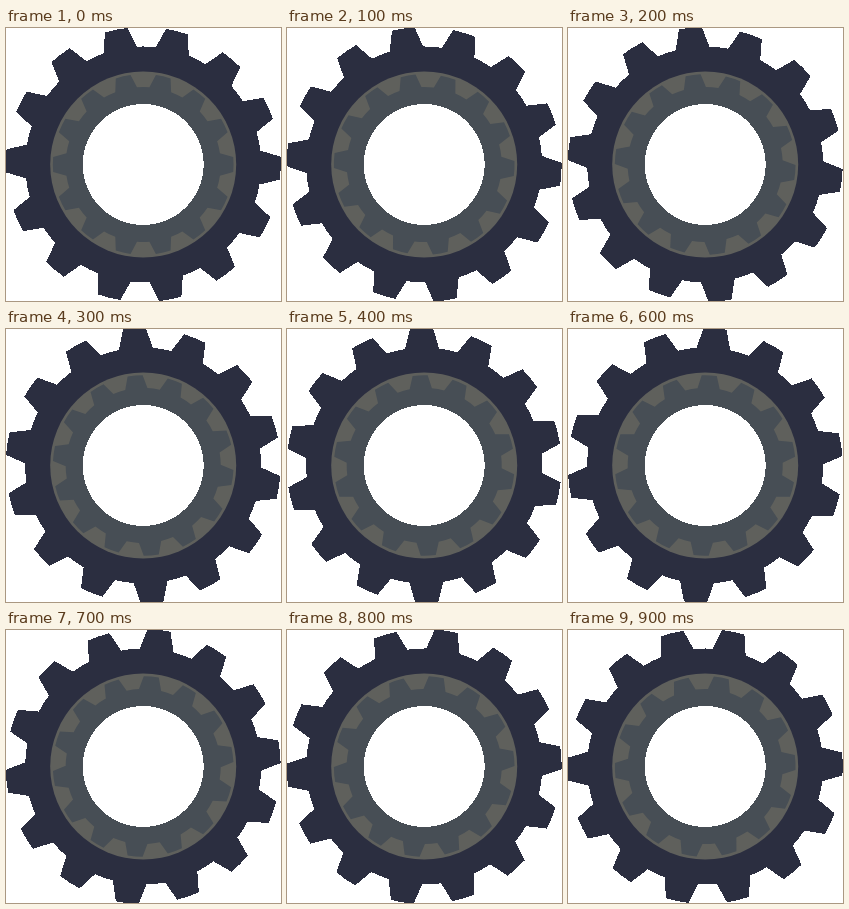
Recreate the animation shown at these times as an HTML page. Size 275 px wide and 273 px high, loop 1000 ms.

```html
<!DOCTYPE html>
<html lang="en">
<head>
<meta charset="utf-8">
<title>Turning gear</title>
<style>
  html, body { margin: 0; width: 100%; height: 100%; overflow: hidden; background: #fff; }
  svg { display: block; width: 100%; height: 100%; }
  .hard { shape-rendering: crispEdges; }
</style>
</head>
<body>
<svg viewBox="0 0 275 273">
  <g transform="translate(137.2 136.5)">
    <path id="outer" class="hard" fill="#2b2e40"/>
    <circle r="93" fill="#5f605c"/>
    <path id="inner" fill="#474e55"/>
    <circle class="hard" r="60.5" fill="#fff"/>
  </g>
</svg>
<script>
const TEETH = 14;
const PITCH = 360 / TEETH;
const LOOP = 1000;
const STEP = 100;

const byId = id => document.getElementById(id);

function point(radius, angle) {
  return `${(radius * Math.sin(angle)).toFixed(2)} ${(-radius * Math.cos(angle)).toFixed(2)}`;
}

// Trapezoid teeth joined by root arcs; the first tooth points straight up.
function gearPath(scale) {
  const tip = 137.5 * scale, root = 118 * scale;
  const tipHalf = 11.5 / 137.5, rootHalf = 17 / 118;
  let d = '';
  for (let i = 0; i < TEETH; i++) {
    const a = i * 2 * Math.PI / TEETH;
    d += i ? `A${root} ${root} 0 0 1 ` : 'M';
    d += point(root, a - rootHalf);
    d += `L${point(tip, a - tipHalf)}`;
    d += `A${tip} ${tip} 0 0 1 ${point(tip, a + tipHalf)}`;
    d += `L${point(root, a + rootHalf)}`;
  }
  return `${d}A${root} ${root} 0 0 1 ${point(root, -rootHalf)}Z`;
}

function makeGear(id, scale, start) {
  const node = byId(id);
  node.setAttribute('d', gearPath(scale));
  return { node, start };
}

const gears = [
  makeGear('outer', 1, -11.35),
  makeGear('inner', 0.657, -PITCH / 2)
];

// One tooth pitch per loop, in ten held steps.
function draw(time) {
  const turn = PITCH * Math.floor((time % LOOP) / STEP) * STEP / LOOP;
  for (const { node, start } of gears) {
    node.setAttribute('transform', `rotate(${start + turn})`);
  }
}

const begin = performance.now();
function tick() {
  draw(performance.now() - begin);
  requestAnimationFrame(tick);
}
draw(0);
requestAnimationFrame(tick);
</script>
</body>
</html>
```
